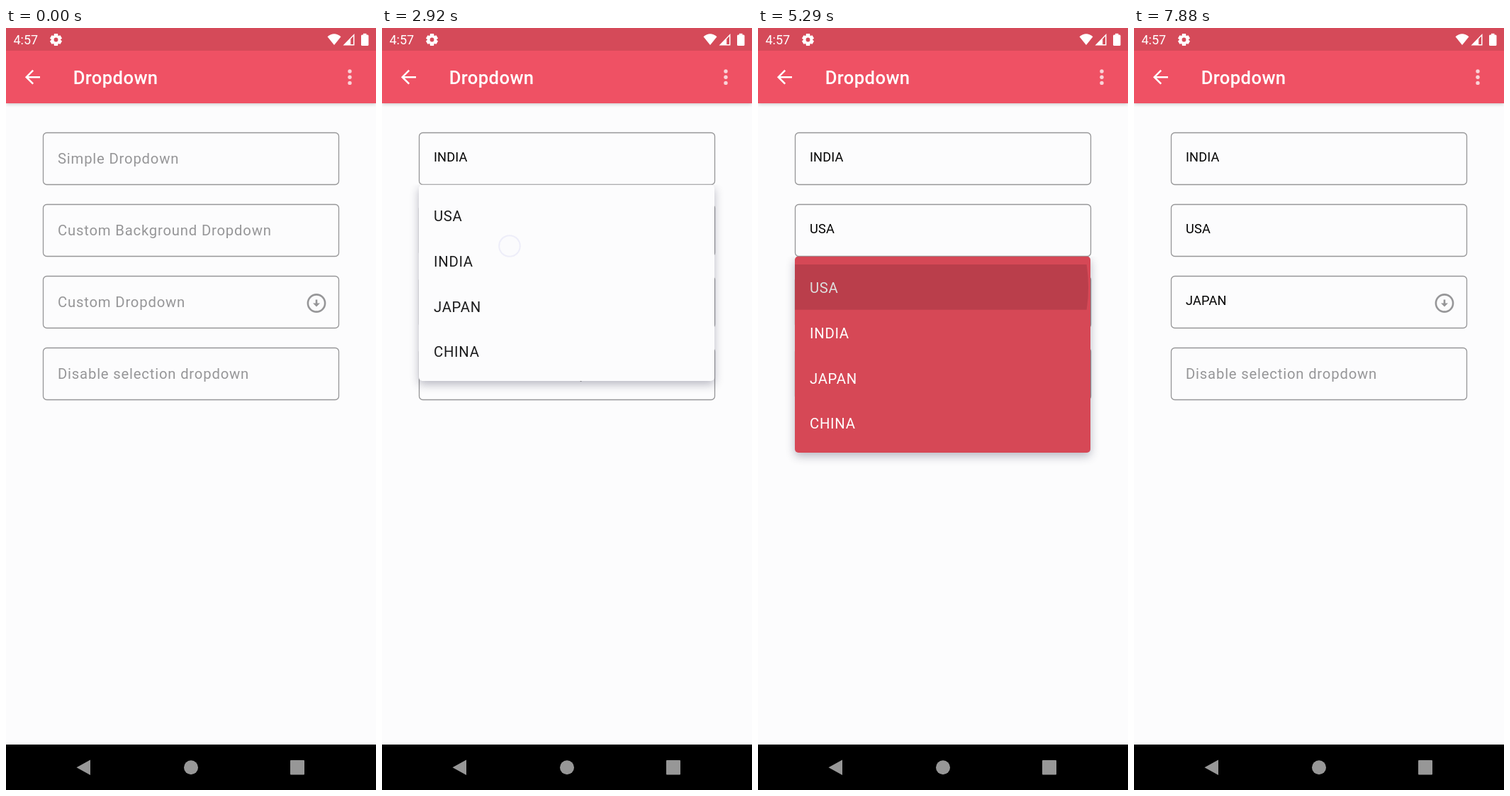
Write an HTML page with a canvas that moves like this. It is 522 by 1073 pixels and loops after 8000 ms.

```html
<!DOCTYPE html>
<html lang="en">
<head>
<meta charset="utf-8">
<title>Dropdown</title>
<style>
html, body { margin: 0; width: 100%; height: 100%; overflow: hidden; background: #fcfcfd; }
canvas { display: block; width: 522px; height: 1073px; }
</style>
</head>
<body>
<canvas id="stage" width="522" height="1073"></canvas>
<script>
const ctx = document.getElementById('stage').getContext('2d');
const LOOP = 8000;
const LEFT = 52, RIGHT = 469, PITCH = 101;
const INK = '#1b1b1c', GREY = '#969698', PAPER = '#fcfcfd', ROSE = '#d64856';
const COUNTRIES = ['USA', 'INDIA', 'JAPAN', 'CHINA'];
const HINTS = ['Simple Dropdown', 'Custom Background Dropdown', 'Custom Dropdown', 'Disable selection dropdown'];

// One entry per menu: times in ms, chosen row, look.
const MENUS = [
  { field: 0, open: 1440, pick: 2890, close: 2960, row: 1, fill: PAPER, ink: INK, step: 63.7, bottom: 497 },
  { field: 1, open: 4050, pick: 5170, close: 5300, row: 0, fill: ROSE, ink: '#fff', step: 63.7, bottom: 598 },
  { field: 2, open: 6300, pick: 7330, close: 7410, row: 2, fill: PAPER, ink: INK, step: 65.2, bottom: 703.5, icons: true }
];
const TAPS = [
  { x: 218, y: 194, down: 1290, up: 1340 },
  { x: 180, y: 307, down: 2770, up: 2840 },
  { x: 204, y: 290, down: 3930, up: 4000 },
  { x: 190, y: 364, down: 5050, up: 5110 },
  { x: 214, y: 391, down: 6180, up: 6250 },
  { x: 196, y: 597, down: 7220, up: 7280 }
];

const ramp = (t, from, to) => Math.min(1, Math.max(0, (t - from) / (to - from)));
const easeOut = p => 1 - (1 - p) ** 3;

function text(str, x, y, size, color, spacing = 0, weight = 400) {
  ctx.font = `${weight} ${size}px Roboto, sans-serif`;
  ctx.letterSpacing = spacing + 'px';
  ctx.fillStyle = color;
  ctx.fillText(str, x, y);
}

function box(x, y, w, h, r) {
  ctx.beginPath();
  ctx.roundRect(x, y, w, h, r);
}

function disc(x, y, r, color) {
  ctx.beginPath();
  ctx.arc(x, y, r, 0, 7);
  ctx.fillStyle = color;
  ctx.fill();
}

function poly(color, ...pts) {
  ctx.beginPath();
  pts.forEach(([x, y]) => ctx.lineTo(x, y));
  ctx.closePath();
  ctx.fillStyle = color;
  ctx.fill();
}

function rect(color, x, y, w, h) {
  ctx.fillStyle = color;
  ctx.fillRect(x, y, w, h);
}

// Ringed arrow; dir is 1 for down, -1 for up.
function arrowIcon(x, y, dir, color) {
  ctx.lineWidth = 2.6;
  ctx.strokeStyle = color;
  ctx.beginPath();
  ctx.arc(x, y, 12.1, 0, 7);
  ctx.stroke();
  poly(color, [x - 5, y], [x - 1.3, y], [x - 1.3, y - 5 * dir], [x + 1.3, y - 5 * dir],
    [x + 1.3, y], [x + 5, y], [x, y + 5 * dir]);
}

function gear(x, y) {
  ctx.save();
  ctx.translate(x, y);
  for (let i = 0; i < 6; i++) {
    poly('#fff', [-2.5, -8.4], [2.5, -8.4], [3.4, -4], [-3.4, -4]);
    ctx.rotate(Math.PI / 3);
  }
  ctx.restore();
  ctx.beginPath();
  ctx.arc(x, y, 4.6, 0, 7);
  ctx.lineWidth = 3.4;
  ctx.strokeStyle = '#fff';
  ctx.stroke();
}

function statusBar() {
  rect('#d54a59', 0, 0, 522, 32);
  text('4:57', 10.5, 23, 18, '#fff');
  gear(70.5, 16.5);
  ctx.beginPath();
  ctx.moveTo(463, 24);
  ctx.lineTo(453.5, 12.2);
  ctx.quadraticCurveTo(463, 4.2, 472.5, 12.2);
  ctx.fillStyle = '#fff';
  ctx.fill();
  poly('#fff', [491.5, 8], [491.5, 24.5], [475.5, 24.5]);
  poly('#d54a59', [490, 11.6], [490, 23], [486.2, 23], [486.2, 15.4]);
  box(501, 9.5, 10.5, 15.5, 1.5);
  ctx.fillStyle = '#fff';
  ctx.fill();
  rect('#fff', 504, 7.8, 4.5, 2);
}

function toolbar() {
  ctx.save();
  ctx.shadowColor = 'rgba(0,0,0,.22)';
  ctx.shadowBlur = 5;
  ctx.shadowOffsetY = 1;
  rect('#ef5164', 0, 32, 522, 74);
  ctx.restore();
  statusBar();
  ctx.strokeStyle = '#fff';
  ctx.lineWidth = 2.5;
  ctx.beginPath();
  ctx.moveTo(48, 69.2);
  ctx.lineTo(29, 69.2);
  ctx.moveTo(38.2, 59.7);
  ctx.lineTo(28.7, 69.2);
  ctx.lineTo(38.2, 78.7);
  ctx.stroke();
  text('Dropdown', 94.7, 79.3, 25.6, '#fff', 0.4, 500);
  for (const y of [61, 69.2, 77.4]) disc(485, y, 2.7, '#f9d3d8');
}

function navBar() {
  rect('#000', 0, 1009, 522, 64);
  poly('#979797', [99.5, 1041.2], [119, 1030.5], [119, 1052]);
  disc(261, 1041.2, 10, '#979797');
  box(401, 1031, 20, 20.5, 1);
  ctx.fillStyle = '#979797';
  ctx.fill();
}

function field(i, t) {
  const y = 147.5 + i * PITCH, menu = MENUS[i];
  box(52.5, y, 417, 73, 5);
  ctx.strokeStyle = GREY;
  ctx.lineWidth = 1.3;
  ctx.stroke();
  if (menu && t >= menu.pick) text(COUNTRIES[menu.row], 73, y + 40, 18.2, '#000', 0.15);
  else text(HINTS[i], 73, y + 43, 20.3, GREY, 0.8);
  if (i === 2) arrowIcon(438, y + 38, 1, GREY);
  if (i === 1) ripple(200, y + 42, t, 3960, 4200, 4290, 4480, [52.5, y, 417, 73]);
}

// Spreading press highlight clipped to a rectangle.
function ripple(x, y, t, start, full, hold, end, [bx, by, bw, bh]) {
  if (t < start || t > end) return;
  const p = ramp(t, start, full);
  ctx.save();
  box(bx, by, bw, bh, bh > 70 ? 5 : 0);
  ctx.clip();
  ctx.globalAlpha *= 0.135 * ramp(t, start, start + 70) * (1 - ramp(t, hold, end));
  const cx = x + (bx + bw / 2 - x) * p;
  disc(cx, y, 30 + 225 * p, '#000');
  ctx.restore();
}

function menu(m, t) {
  const end = m.close + 200;
  if (t < m.open || t >= end) return;
  const top = 220.5 + m.field * PITCH;
  const reveal = easeOut(ramp(t, m.open, m.open + 230));
  const h = (m.bottom - top) * (0.15 + 0.85 * reveal);
  ctx.save();
  ctx.globalAlpha = ramp(t, m.open - 20, m.open + 100) * (1 - ramp(t, m.close, end));
  ctx.save();
  ctx.beginPath();
  ctx.rect(0, top, 522, 600);
  ctx.clip();
  ctx.shadowColor = 'rgba(30,30,60,.3)';
  ctx.shadowBlur = 13;
  ctx.shadowOffsetY = 5;
  box(LEFT, top, RIGHT - LEFT, h, 5);
  ctx.fillStyle = m.fill;
  ctx.fill();
  ctx.restore();

  box(LEFT, top, RIGHT - LEFT, h, 5);
  ctx.clip();
  COUNTRIES.forEach((name, i) => {
    const y = top + 11 + i * m.step;
    text(name, 73, y + 40.7, 20.3, m.ink, 0.7);
    if (!m.icons) return;
    arrowIcon(431.5, y + 34, -1, INK);
    if (i < 3) rect('#111', LEFT, y + 65.6, RIGHT - LEFT, 1.5);
  });
  const y = top + 11.5 + m.row * m.step;
  const start = m.field === 0 ? m.close - 30 : m.pick - 30;
  ripple(195, y + 32, t, start, start + 182, end, end + 1, [LEFT, y, RIGHT - LEFT, 63.7]);
  ctx.restore();
}

function tap(p, t) {
  const a = ramp(t, p.down, p.down + 30) * (1 - ramp(t, p.up, p.up + 100));
  if (!a) return;
  ctx.save();
  ctx.globalAlpha = a;
  disc(p.x, p.y, 15, 'rgba(250,250,255,.7)');
  ctx.beginPath();
  ctx.arc(p.x, p.y, 14.8, 0, 7);
  ctx.lineWidth = 2;
  ctx.strokeStyle = '#b4b4ec';
  ctx.stroke();
  ctx.restore();
}

function draw(t) {
  rect(PAPER, 0, 0, 522, 1073);
  HINTS.forEach((_, i) => field(i, t));
  toolbar();
  MENUS.forEach(m => menu(m, t));
  navBar();
  TAPS.forEach(p => tap(p, t));
}

const begin = performance.now();
function frame() {
  draw((performance.now() - begin) % LOOP);
  requestAnimationFrame(frame);
}
frame();
</script>
</body>
</html>
```
